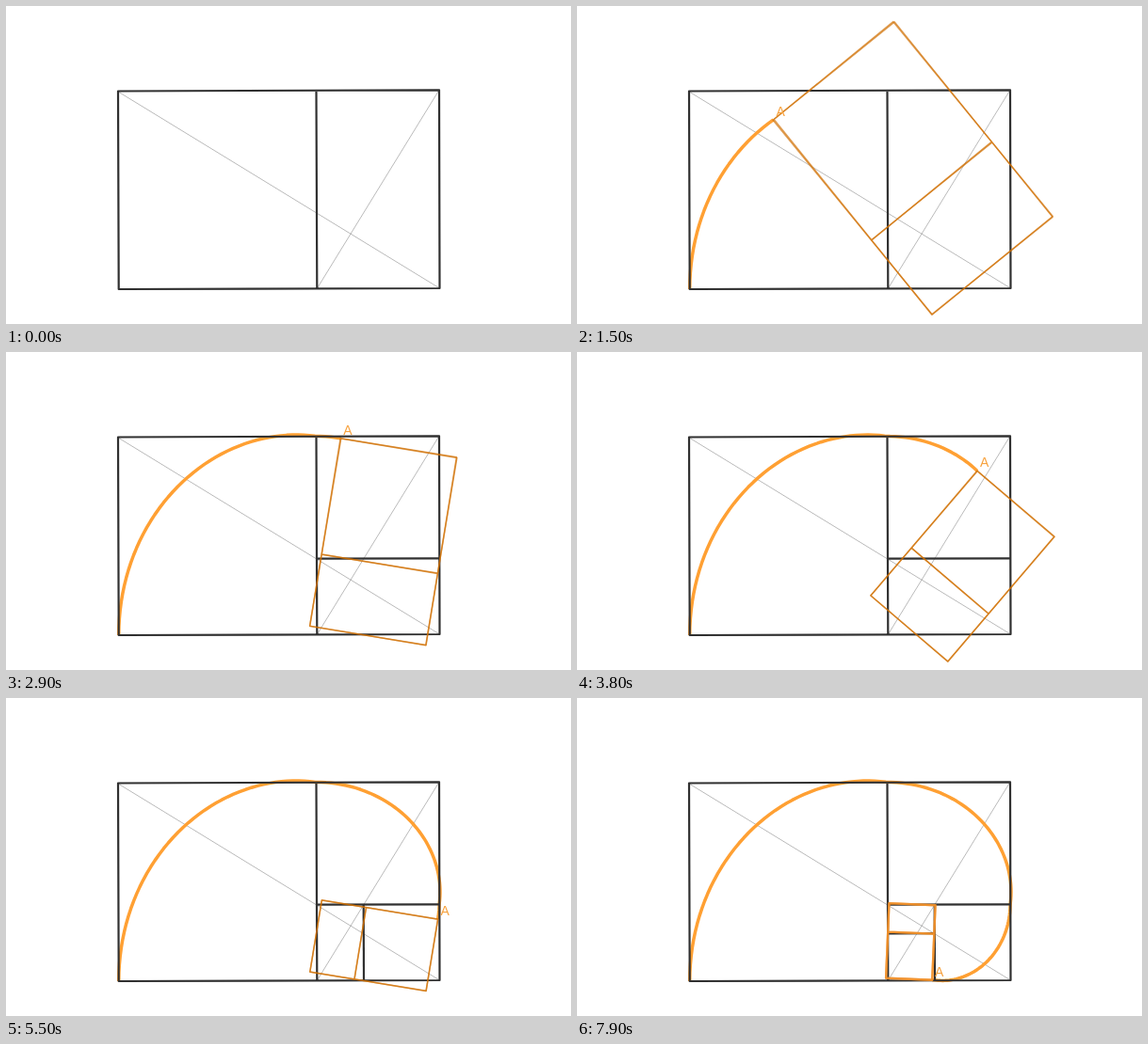
Write an HTML page that moves like this. It is 600 by 338 pixels and loops after 8 s.

```html
<!DOCTYPE html>
<html lang="en">
<head>
<meta charset="utf-8">
<title>Golden spiral</title>
<style>
  html, body { margin: 0; width: 100%; height: 100%; overflow: hidden; background: #fff; }
  svg { display: block; width: 100vw; height: 100vh; }
  path { fill: none; }
  .frame { stroke: #303030; stroke-width: 2.2; stroke-linejoin: round; }
  .diagonal { stroke: #8c8c8c; stroke-width: .6; }
  .trail { stroke: #ffa033; stroke-width: 3.5; stroke-linecap: butt; stroke-linejoin: round; }
  .turning { stroke: #d07000; stroke-width: 1.5; stroke-opacity: .66; stroke-linejoin: round; }
  .turning.small { stroke: #f3922a; stroke-width: 2.3; stroke-opacity: .8; }
  text { font: 14px "Liberation Sans", Arial, sans-serif; fill: #f7a13c; text-anchor: middle; }
</style>
</head>
<body>
<svg viewBox="0 0 600 338">
  <path class="diagonal" d="M119 91L460.5 300M459.5 90L330.5 300"/>
  <path id="trail" class="trail"/>
  <path class="frame" d="M119 90.5L460 89.3L460.5 300L119.7 301ZM329.5 90L330.3 300"/>
  <path class="frame division" d="M330 219.7L460.3 219.4"/>
  <path class="frame division" d="M379.7 219.5L380 300"/>
  <path class="frame division" d="M330.2 250.4L380 250.2"/>
  <path id="lead" class="turning"/>
  <path id="echo" class="turning"/>
  <text id="label">A</text>
</svg>
<script>
const LOOP = 8000, STEP = 100, DELAY = 25, QUARTER = 2600;
const SHRINK = (Math.sqrt(5) - 1) / 2;
const pole = [366, 241.7];
const start = [119.7, 301];
const outline = [[119, 90.5], [460, 89.3], [460.5, 300], start];
const divider = [[329.5, 90], [330.3, 300]];

const byId = id => document.getElementById(id);
const [trail, lead, echo, label] = ['trail', 'lead', 'echo', 'label'].map(byId);
const divisions = document.querySelectorAll('.division');

// The size falls linearly within each quarter turn.
function scaleAt(turn) {
  const whole = Math.floor(turn);
  return SHRINK ** whole * (1 - (1 - SHRINK) * (turn - whole));
}

function move([x, y], turn) {
  const angle = turn * Math.PI / 2, s = scaleAt(turn);
  const c = Math.cos(angle) * s, n = Math.sin(angle) * s;
  const dx = x - pole[0], dy = y - pole[1];
  return [pole[0] + dx * c - dy * n, pole[1] + dx * n + dy * c];
}

const line = points => 'M' + points.map(p => p.map(v => v.toFixed(2)).join(' ')).join('L');

function rectangle(turn) {
  const place = p => move(p, turn);
  return line(outline.map(place)) + 'Z' + line(divider.map(place));
}

function spiral(turn) {
  const count = Math.max(2, Math.ceil(turn * 45));
  return line(Array.from({ length: count + 1 }, (_, i) => move(start, turn * i / count)));
}

function draw(time) {
  const now = Math.floor(time % LOOP / STEP) * STEP;
  const turn = Math.max(0, now - DELAY) / QUARTER;
  const moving = turn > 0;
  for (const part of [trail, lead, echo, label]) {
    part.style.display = moving ? '' : 'none';
  }
  divisions.forEach((d, i) => d.style.display = turn >= i + 1 ? '' : 'none');
  if (!moving) return;

  const spread = .0025 * scaleAt(turn);
  trail.setAttribute('d', spiral(turn));
  lead.setAttribute('d', rectangle(turn + spread));
  echo.setAttribute('d', rectangle(Math.max(0, turn - spread)));
  for (const part of [lead, echo]) part.classList.toggle('small', turn >= 3);

  const [x, y] = move(start, turn);
  label.setAttribute('x', x + 7.5);
  label.setAttribute('y', y - 4);
}

const origin = performance.now();
function tick() {
  draw(performance.now() - origin);
  requestAnimationFrame(tick);
}
tick();
</script>
</body>
</html>
```
